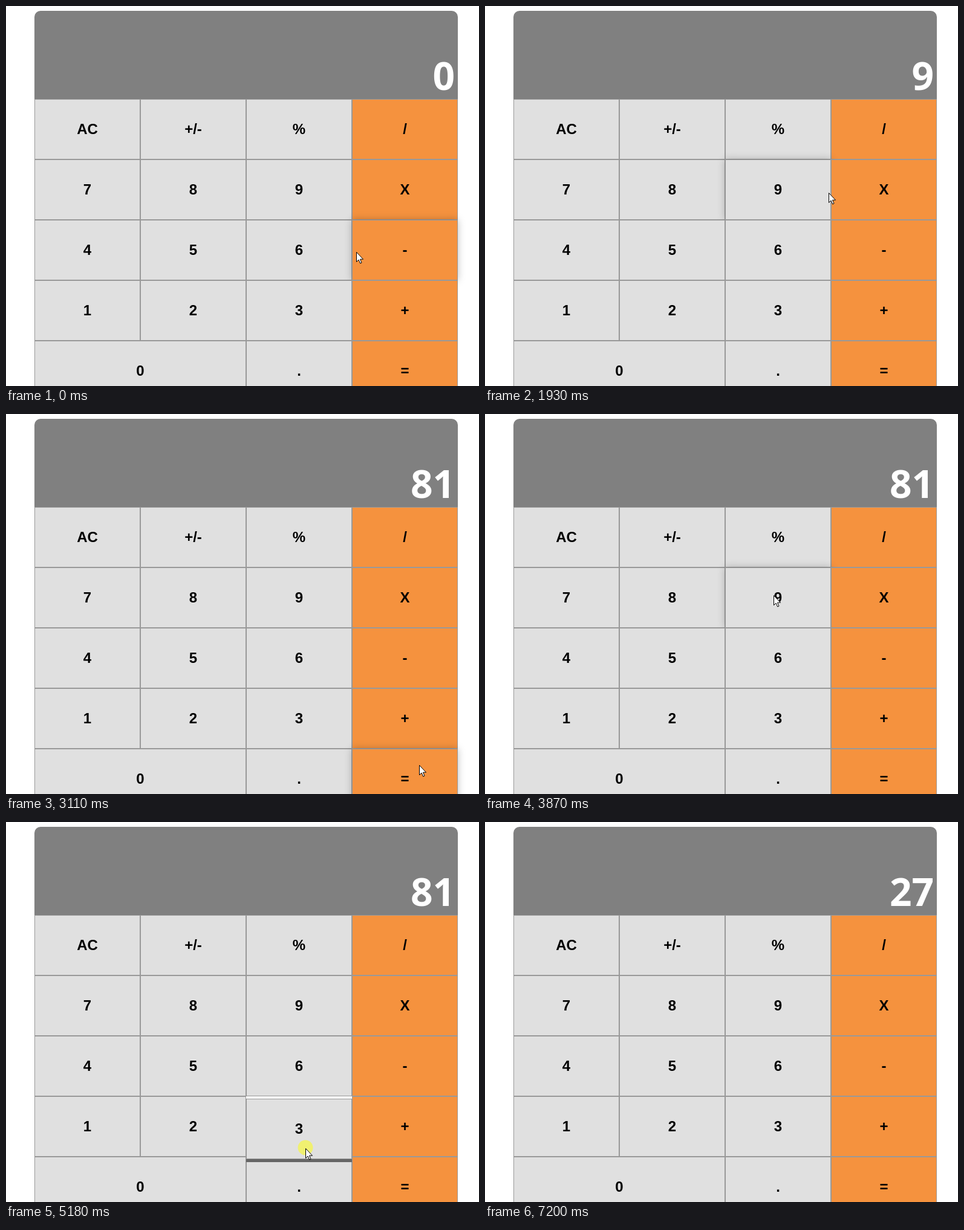
An HTML page for the animation above (7.75 s loop, 782x629 px).

```html
<!DOCTYPE html>
<html lang="en">
<head>
<meta charset="utf-8">
<title>Calculator</title>
<style>
html, body { margin: 0; width: 100%; height: 100%; overflow: hidden; background: #fff; }
#stage { position: relative; width: 782px; height: 629px; overflow: hidden; }
#stage > * { position: absolute; box-sizing: border-box; }
#screen {
  left: 47px; top: 8px; width: 700px; height: 146px;
  border-radius: 10px 10px 0 0; background: #808080;
}
#value {
  right: 40px; top: 115px; color: #fff;
  font: bold 64px/0 "Open Sans", "Noto Sans", sans-serif;
}
#keys {
  left: 47px; top: 154px; width: 700px;
  display: grid; grid-template-columns: repeat(4, 175px); grid-auto-rows: 100px;
}
.key {
  position: relative; border: 1px solid #999; background: #e0e0e0;
  font: bold 24px/98px "Liberation Sans", Arial, sans-serif; text-align: center;
}
.op { background: #f5923e; }
.wide { grid-column: span 2; }
.hover { box-shadow: 0 0 12px rgba(0, 0, 0, .25); }
.down { z-index: 1; transform: translateY(4px); box-shadow: 0 5px #666; }
#pointer { left: 0; top: 0; z-index: 2; overflow: visible; }
</style>
</head>
<body>
<div id="stage">
  <div id="screen"></div>
  <div id="value">0</div>
  <div id="keys"></div>
  <svg id="pointer" width="1" height="1">
    <circle id="glow" cy="-1" r="12.5" fill="#ff0" fill-opacity=".5"/>
    <path d="M.5 .5V16.5L4 13L6.7 19L9 18L6.5 12.2H11.5Z" fill="#fff" stroke="#000"/>
  </svg>
</div>
<script>
const LOOP = 7750, PAUSE = 100, HOLD = 310, PRESS_DELAY = 75;
const $ = id => document.getElementById(id);

// Each move glides to a point along a bowed path; a key name means a click there.
const home = { x: 579, y: 407 };
const moves = [
  { x: 498, y: 307, from: 0, to: 970, bow: [-110, -110], key: "9" },
  { x: 630, y: 300, from: 1770, to: 2080, bow: [0, 6], key: "X" },
  { x: 683, y: 581, from: 2510, to: 2660, bow: [-85, 0], key: "=" },
  { x: 477, y: 300, from: 3290, to: 3870, bow: [30, 0] },
  { x: 650, y: 205, from: 3950, to: 4080, bow: [0, -85], key: "/" },
  { x: 495, y: 540, from: 4600, to: 4870, bow: [0, 0], key: "3" },
  { x: 624, y: 595, from: 5290, to: 5460, bow: [0, 0], key: "=" },
  { x: 760, y: 640, from: 5990, to: 7200, bow: [0, -155] }
];
const clicks = moves.filter(m => m.key);

const keys = [..."AC +/- % / 7 8 9 X 4 5 6 - 1 2 3 + 0 . =".split(" ")].map(label => {
  const el = document.createElement("div");
  el.className = "key";
  el.classList.toggle("wide", label === "0");
  el.classList.toggle("op", "/X-+=".includes(label));
  el.textContent = label;
  $("keys").append(el);
  return el;
});

function pointerAt(t) {
  const i = moves.findLastIndex(m => t >= m.from);
  const a = moves[i - 1] || home, b = moves[i];
  const p = Math.min(1, (t - b.from) / (b.to - b.from));
  const k = p * p * (3 - 2 * p), arc = 4 * k * (1 - k);
  return [
    Math.round(a.x + (b.x - a.x) * k + b.bow[0] * arc),
    Math.round(a.y + (b.y - a.y) * k + b.bow[1] * arc)
  ];
}

// Replay the clicked keys; "=" without a second number reuses the first.
function valueOf(labels) {
  let shown = 0, stored = 0, op = "";
  for (const label of labels) {
    if (label === "=") shown = op === "X" ? stored * shown : stored / shown;
    else if ("X/".includes(label)) [stored, op] = [shown, label];
    else shown = +label;
  }
  return shown;
}

function draw(t) {
  const [x, y] = pointerAt(t);
  const age = m => t - m.to - PAUSE;
  const click = clicks.find(m => age(m) >= 0 && age(m) < HOLD);
  const done = clicks.filter(m => age(m) >= HOLD);
  const pressed = click && age(click) >= PRESS_DELAY;
  for (const el of keys) {
    const left = el.offsetLeft + 47, top = el.offsetTop + 154;
    const over = y < 629 && x >= left && x < left + el.offsetWidth && y >= top && y < top + 100;
    el.classList.toggle("hover", over);
    el.classList.toggle("down", !!(over && pressed));
  }
  $("value").textContent = valueOf(done.map(m => m.key));
  $("glow").style.display = click ? "" : "none";
  $("pointer").style.transform = `translate(${x}px, ${y}px)`;
}

const start = performance.now();
function tick() {
  draw((performance.now() - start) % LOOP);
  requestAnimationFrame(tick);
}
tick();
</script>
</body>
</html>
```
